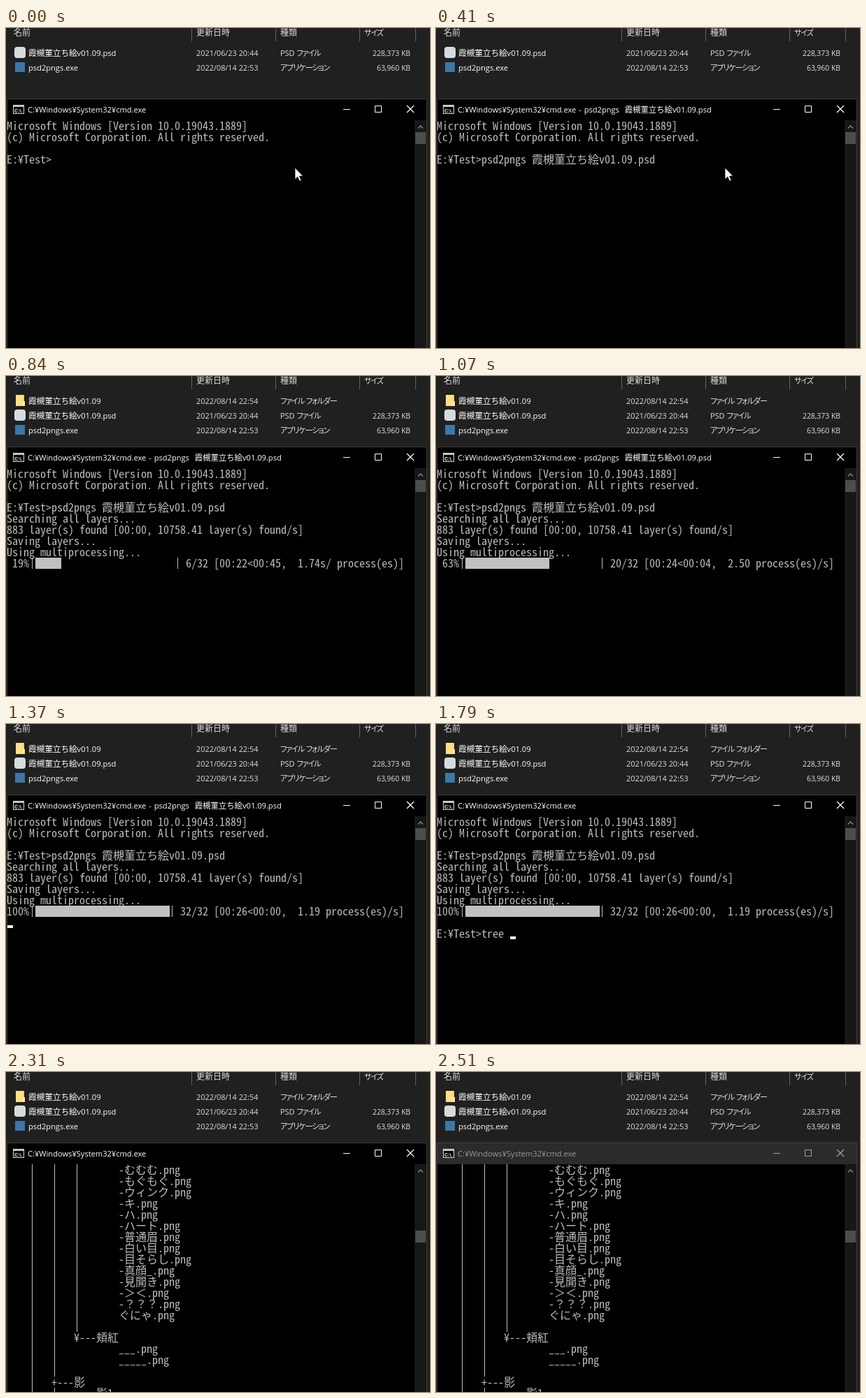
An HTML page that plays this animation: 606 by 458 pixels, repeating every 2550 ms.

```html
<!DOCTYPE html>
<html lang="ja">
<head>
<meta charset="utf-8">
<title>psd2pngs</title>
<style>
html, body { margin: 0; width: 100%; height: 100%; overflow: hidden; background: #202020; }
#stage { position: absolute; left: 0; top: 0; width: 606px; height: 458px; overflow: hidden; background: #202020; }
#stage svg { position: absolute; left: 0; top: 0; }

.label {
  position: absolute; height: 20px; white-space: pre; color: #dedede;
  font: 10.9px/20px "Open Sans", "Noto Sans", sans-serif;
}
.label b { font: 12px/0 "Noto Sans CJK JP", "Noto Sans CJK", sans-serif; }
.label.name { color: #fff; font-size: 11.1px; }
.label.name b { font-size: 11.8px; letter-spacing: -.2px; }
.label.kana b { font-size: 11.2px; font-feature-settings: "palt"; letter-spacing: -1.2px; }
.label.size { font-size: 10.4px; }
.label.title { color: #fff; font-size: 11.1px; word-spacing: 1px; }
.label.title b { font-size: 11.4px; }
.sep { position: absolute; top: 0; width: 1px; height: 19px; background: #636363; }
.group { position: absolute; inset: 0; }
.has-folder #files { transform: translateY(21px); }
#folder { visibility: hidden; }
.has-folder #folder { visibility: visible; }

#console { position: absolute; left: 1px; top: 101px; width: 599px; height: 360px; border: 1px solid #3f3f3f; background: #000; }
#bar { position: absolute; left: 2px; top: 102px; width: 599px; height: 30px; background: #000; }
.inactive #bar { background: #2b2b2b; }
.inactive .title { color: #9a9a9a; }
.inactive #buttons { stroke: #a0a0a0; }
#track { position: absolute; left: 584px; top: 132px; width: 17px; height: 326px; background: #171717; }
#thumb { position: absolute; left: 585px; width: 15px; height: 17px; background: #4d4d4d; }

#screen {
  position: absolute; left: 2px; top: 132px; width: 582px; height: 326px; overflow: hidden; color: #bcbcbc;
  font: 300 16px/14px "Noto Sans Mono CJK JP", "Noto Sans Mono", "Noto Sans CJK JP", monospace;
}
#screen div { height: 16px; white-space: nowrap; display: flex; }
#screen i { flex: none; width: 8px; height: 16px; font-style: normal; text-indent: -1px; }
#screen .wide { width: 16px; }
#screen .pipe { background: linear-gradient(#c0c0c0, #c0c0c0) 3px 0 / 1px 16px no-repeat; }
#screen .caret { background: linear-gradient(#f2f2f2, #f2f2f2) 0 12px / 8px 4px no-repeat; }
</style>
</head>
<body>
<div id="stage">
  <div id="list">
    <div class="group" id="folder">
      <svg width="606" height="100">
        <path d="M14 27h12v16H14z" fill="#f6d06a"/>
        <path d="M14 27h10v16H14z" fill="#ffdf87"/>
        <path d="M24 36h3v7h-3z" fill="#ffe9a8"/>
      </svg>
    </div>
    <div class="group" id="files">
      <svg width="606" height="100">
        <rect x="12" y="27" width="16" height="16" rx="4" fill="#d6dcdc"/>
        <rect x="13" y="49" width="14" height="14" fill="#3b77a8"/>
      </svg>
    </div>
  </div>
  <div id="console"></div>
  <div id="bar"></div>
  <div id="screen"></div>
  <div id="track"></div>
  <div id="thumb"></div>
  <svg width="606" height="458">
    <rect x="10.5" y="110.5" width="15" height="12" fill="#000" stroke="#d8d8d8"/>
    <path d="M11 111h14v2H11z" fill="#b8c0c8"/>
    <text x="12" y="120.5" fill="#fff" font-family="Liberation Sans, sans-serif" font-weight="bold" font-size="7">C:\.</text>
    <g id="buttons" fill="none" stroke="#fff">
      <path d="M482 116.5h10M527.5 111.5h9v9h-9z"/>
      <path d="M573 111l10 10M583 111l-10 10" stroke-width="1.3"/>
    </g>
    <path d="M589 143.5l3.5-3.5 3.5 3.5" fill="none" stroke="#858585" stroke-width="1.5"/>
    <path id="mouse" d="M413 200v16.5l3.8-3.6 2.7 6.1 2.5-1.1-2.6-5.9h5.1z" fill="#fff" stroke="#000" stroke-width=".7"/>
  </svg>
</div>
<script>
const LOOP = 2550;
const $ = id => document.getElementById(id);
const stage = $('stage');

function fill(node, text) {
  node.innerHTML = text.replace(/[^ -~¥]+/g, '<b>$&</b>');
}

// x is the left edge, or the right edge when negative
function label(parent, x, y, text, cls = '') {
  const node = document.createElement('div');
  node.className = 'label ' + cls;
  node.style.top = y - 10 + 'px';
  if (x < 0) node.style.right = 606 + x + 'px';
  else node.style.left = x + 'px';
  fill(node, text);
  parent.append(node);
  return node;
}

function fileRow(parent, y, name, date, type, size) {
  label(parent, 32, y, name, 'name');
  label(parent, 272, y, date);
  label(parent, 392, y, type, 'kana');
  label(parent, -578, y, size, 'size');
}

const art = '霞槻菫立ち絵v01.09';
const list = $('list');
label(list, 11, 7, '名前');
label(list, 272, 7, '更新日時');
label(list, 392, 7, '種類');
label(list, 512, 7, 'サイズ', 'kana');
for (const x of [265, 385, 505, 585]) {
  const sep = document.createElement('div');
  sep.className = 'sep';
  sep.style.left = x + 'px';
  list.append(sep);
}
fileRow($('folder'), 36, art, '2022/08/14 22:54', 'ファイル フォルダー', '');
fileRow($('files'), 36, art + '.psd', '2021/06/23 20:44', 'PSD ファイル', '228,373 KB');
fileRow($('files'), 57, 'psd2pngs.exe', '2022/08/14 22:53', 'アプリケーション', '63,960 KB');
const title = label(stage, 31, 117, '', 'title');

// Terminal text
const CARET = '\u2581';
const COLS = 71;
const PROMPT = 'E:¥Test>';
const CMD = 'C:¥Windows¥System32¥cmd.exe';
const command = `psd2pngs ${art}.psd`;
const head = [
  'Microsoft Windows [Version 10.0.19043.1889]',
  '(c) Microsoft Corporation. All rights reserved.',
  ''
];
const started = [...head, PROMPT + command];
const found = [
  ...started,
  'Searching all layers...',
  '883 layer(s) found [00:00, 10758.41 layer(s) found/s]',
  'Saving layers...'
];
const saving = [...found, 'Using multiprocessing...'];

const clock = s => [s / 60, s % 60].map(v => String(Math.floor(v)).padStart(2, '0')).join(':');

// pace is seconds per process
function progress(n, secs, pace) {
  const rate = !pace ? '? process(es)/s'
    : pace > 1 ? pace.toFixed(2).padStart(5) + 's/ process(es)'
    : (1 / pace).toFixed(2).padStart(5) + ' process(es)/s';
  const left = pace ? clock((32 - n) * pace) : '?';
  const start = String(Math.round(n / 32 * 100)).padStart(3) + '%|';
  const end = `| ${n}/32 [${clock(secs)}<${left}, ${rate}]`;
  const width = COLS - start.length - end.length;
  const eighths = Math.floor(n / 32 * width * 8);
  const part = eighths % 8;
  const blocks = '█'.repeat(eighths >> 3) + (part ? String.fromCharCode(0x2590 - part) : '');
  return start + blocks.padEnd(width) + end;
}

const done = [...saving, progress(32, 26, .84)];

const stem = '    |   |   |       ';
const faces = ['-むむむ', '-もぐもぐ', '-ウィンク', '-キ', '-ハ', '-ハート', '-普通眉', '-白い目',
  '-目そらし', '-真顔_', '-見開き', '-＞＜', '-？？？', 'ぐにゃ'];
const faceRow = name => stem + name + '.png';
const tree = [
  ...faces.map(faceRow),
  '    |   |   |',
  '    |   |   ¥---頬紅',
  '    |   |           ___.png',
  '    |   |           _____.png',
  '    |   |',
  '    |   +---影',
  '    |   |       影1'
];
const passing = shift => Array.from({ length: 21 }, (_, i) => {
  const k = (i + shift) % 9;
  return k == 0 ? '    |   |   |' : k == 1 ? '    |   |   +---' + (shift > 4 ? '目' : '口')
    : faceRow(faces[(i * 3 + shift) % faces.length]);
});

// Each scene keeps what it does not change
const scenes = [];
function scene(time, change) {
  scenes.push({ ...scenes[scenes.length - 1], ...change, time });
}

scene(0, { title: CMD, rows: [...head, PROMPT], thumb: 149, mouse: true, folder: false, inactive: false });
[0, 2, 5, 8, 9, command.length].forEach((n, i) =>
  scene(50 + i * 60, { rows: [...head, PROMPT + command.slice(0, n) + CARET] }));
scene(410, { title: `${CMD} - psd2pngs  ${art}.psd`, rows: started });
scene(480, { rows: found, folder: true, mouse: false });
[
  [550, 0, 0, 0], [620, 1, 20, 20.1], [680, 2, 21, 8.9], [730, 3, 21, 5.2], [790, 4, 22, 3.3],
  [840, 6, 22, 1.74], [890, 7, 22, 1.4], [950, 10, 23, .8], [1010, 14, 23, .5],
  [1070, 20, 24, .4], [1130, 26, 25, .45], [1190, 29, 25, .6], [1250, 31, 26, .7], [1310, 32, 26, .84]
].forEach(([time, ...state]) => scene(time, { rows: [...saving, progress(...state)] }));
scene(1370, { rows: [...done, CARET] });
scene(1430, { title: CMD, rows: [...done, '', PROMPT] });
[0, 1, 2, 3, 4, 5, 6, 7, 8, 10].forEach((n, i) =>
  scene(1490 + i * 60, { rows: [...done, '', PROMPT + 'tree /a /f'.slice(0, n) + CARET] }));
scene(2100, {
  title: CMD + ' - tree  /a /f',
  rows: [...Array(10).fill(''), PROMPT + 'tree /a /f', 'フォルダー パスの一覧:  ボリューム Files']
});
scene(2170, { rows: passing(3), thumb: 175 });
scene(2240, { rows: passing(7), thumb: 201 });
scene(2310, { title: CMD, rows: tree, thumb: 227 });
scene(2510, { inactive: true });

function cell(ch) {
  const node = document.createElement('i');
  const code = ch.charCodeAt(0);
  if (ch == '|') node.className = 'pipe';
  else if (ch == CARET) node.className = 'caret';
  else if (code >= 0x2588 && code < 0x2590)
    node.style.background = `linear-gradient(#c0c0c0, #c0c0c0) 0 0 / ${0x2590 - code}px 16px no-repeat`;
  else if (ch != ' ') node.textContent = ch;
  if (code > 0x2fff) node.className = 'wide';
  return node;
}

function row(text) {
  const node = document.createElement('div');
  node.append(...[...text].map(cell));
  return node;
}

let shown;
function show(s) {
  if (s == shown) return;
  shown = s;
  fill(title, s.title);
  $('screen').replaceChildren(...s.rows.map(row));
  $('thumb').style.top = s.thumb + 'px';
  $('mouse').style.display = s.mouse ? '' : 'none';
  stage.classList.toggle('has-folder', s.folder);
  stage.classList.toggle('inactive', s.inactive);
}

const begin = performance.now();
function tick() {
  const t = (performance.now() - begin) % LOOP;
  show(scenes.filter(s => s.time <= t).pop());
  requestAnimationFrame(tick);
}
tick();
</script>
</body>
</html>
```
